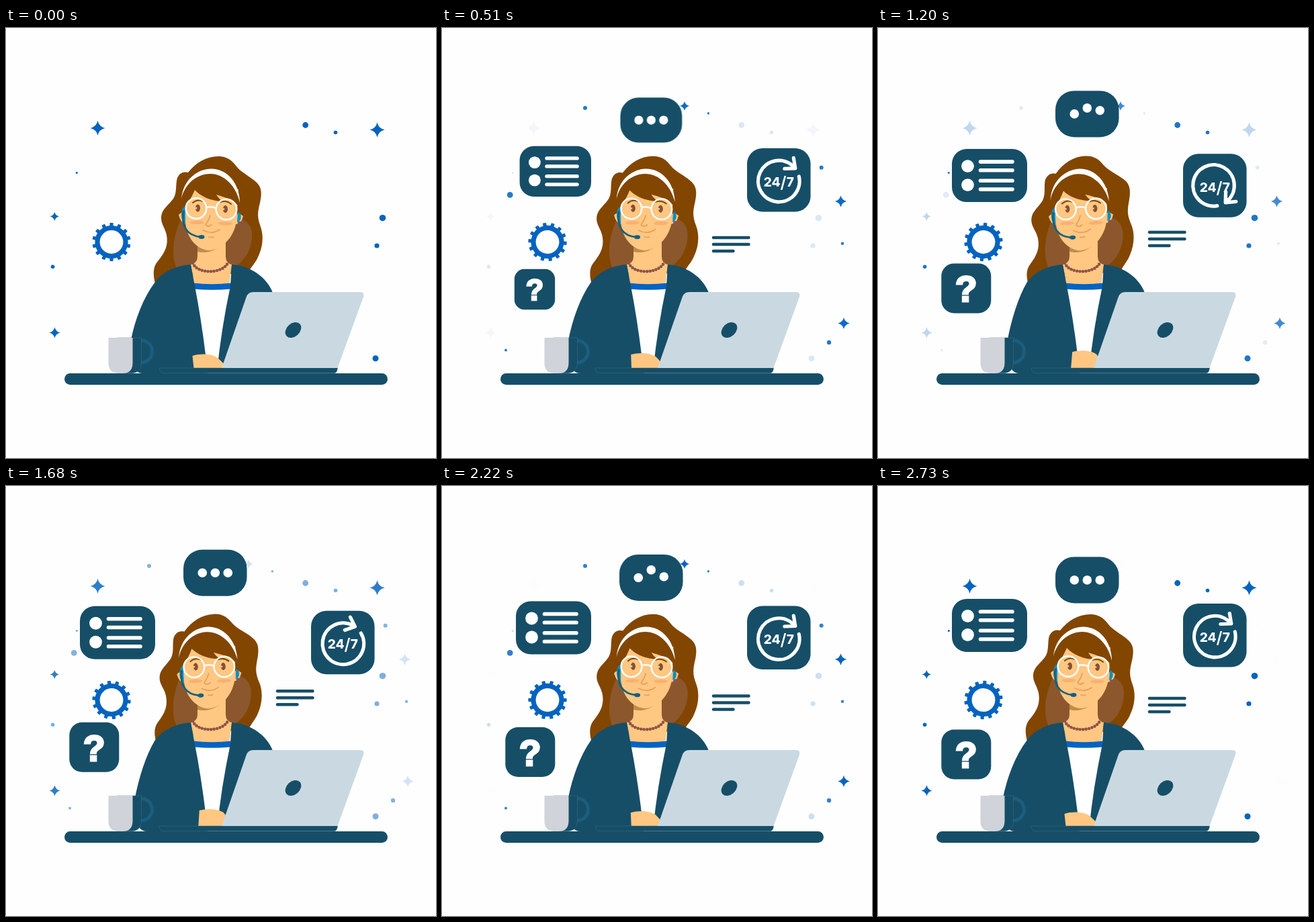
Animation, 640 px wide and 640 px high, one loop 2760 ms. Source, as an HTML page:

```html
<!DOCTYPE html>
<html lang="en">
<head>
<meta charset="utf-8">
<title>Customer support</title>
<style>
  html, body { margin: 0; width: 100%; height: 100%; overflow: hidden; background: #fefefe; }
  svg { display: block; width: 100%; height: 100%; }
  .navy { fill: #164e68; }
  .blue { fill: #0463bf; }
  .skin { fill: #ffc782; }
  .hair { fill: #824600; }
  .white { fill: #fff; }
  .line { fill: none; stroke-linecap: round; stroke-linejoin: round; }
</style>
</head>
<body>
<svg viewBox="0 0 640 640" xmlns="http://www.w3.org/2000/svg">
  <g id="sparkles" class="blue"></g>

  <g id="gear">
    <circle r="21" fill="none" stroke="#0463bf" stroke-width="7.2"/>
    <g id="teeth" class="blue"></g>
  </g>

  <g id="backHair">
    <path class="hair" d="M316 191C330 191 337 198 343 206C350 215 362 220 372 229C381 237 381 246 378 260C374 276 374 282 379 296C384 310 382 327 375 341C371 350 366 354 360 364L230 374L222 380C219 368 218 356 226 347C236 335 242 324 239 308C237 298 231 292 231 283C231 270 241 265 249 254C255 245 252 232 255 223C258 216 264 213 271 215C283 200 298 191 316 191Z"/>
    <path fill="#8c572c" d="M262 281C252 302 241 336 257 364L340 356C358 345 367 325 366 305C364 292 357 286 345 283Z"/>
  </g>

  <path class="skin" d="M285 315V340Q285 350 275 352L281 384H332L336 352Q327 350 327 340V310Z"/>
  <path fill="#c08c4e" d="M285 315V333Q309 338 327 316Z"/>
  <path class="white" d="M279 385H336L314 510H298Z"/>
  <path fill="#0463c4" d="M278 379.5Q306 383 336 379.500L334 388.500Q306 391 280 388.500Z"/>
  <path class="line" stroke="#8e5347" stroke-width="4.600" stroke-dasharray="0 4.500" d="M278 350C285 367 322 366 330 350"/>
  <path class="navy" d="M336 352C362 353 389 371 397 394L400 512H314Q320 450 334 384Z"/>
  <path id="sleeve" class="navy"/>

  <g id="head">
    <path class="skin" d="M257 278Q262 272 268 276V291Q260 291 257 278ZM353 280Q346 274 341 279V292Q350 293 353 280Z"/>
    <circle cx="348" cy="291" r="3.200" fill="#8e5347"/>
    <path class="skin" d="M267 240V288C269 318 289 331 303 331C322 329 339 312 343 288L346 240Z"/>
    <path class="hair" d="M264 268C260 235 280 214 304 214C332 214 348 240 348 268C344 262 338 256 328 253Q320 250 313 248Q317 255 323 258C305 258 289 250 281 241C277 250 272 260 264 268Z"/>
    <path class="white" d="M261 254C264 223 288 209.500 305 209.500C330 209.500 348 232 348 260C343 236 325 217 304 217C284 217 266 232 261 254Z"/>
    <path fill="#0e8fc0" d="M267 265C259 268 259 288 267 291ZM345 274C352 276 351 288 344 289Z"/>
    <g class="line" stroke="#824600" stroke-width="2">
      <path d="M278 260Q285 254 293 258M319 259Q328 256 335 262"/>
    </g>
    <g fill="#84503a">
      <ellipse cx="285.500" cy="268" rx="3.500" ry="5.500"/>
      <ellipse cx="326.500" cy="269.500" rx="3.500" ry="5.500"/>
    </g>
    <g class="skin"><circle cx="283" cy="268" r="1.500"/><circle cx="324" cy="269.500" r="1.500"/></g>
    <g fill="#fbb06f">
      <ellipse cx="284" cy="289.500" rx="10.500" ry="2.700"/>
      <ellipse cx="326.500" cy="291" rx="10.500" ry="2.700"/>
    </g>
    <g class="line" stroke="#e5a05a" stroke-width="1.700">
      <path d="M304 279C303 285 299 289 297 293Q301 297 306 293M293 301Q307 308 318 300M302 311Q305 312 309 311"/>
    </g>
    <g class="line" stroke="#fff" stroke-width="2.400">
      <circle cx="283" cy="268.500" r="15.300"/>
      <circle cx="328" cy="270" r="15.300"/>
      <path d="M299 267Q306 265 312 268"/>
    </g>
    <path class="line" stroke="#14607f" stroke-width="2.800" d="M264 273C261 294 268 309 290 311"/>
    <ellipse cx="291" cy="311" rx="4.500" ry="3" fill="#14607f"/>
  </g>

  <path id="hand" class="skin"/>
  <rect class="navy" x="87" y="514" width="481" height="17" rx="8.500"/>
  <path class="navy" stroke="#3a738c" stroke-width=".5" d="M228 506H493.500Q493 513.700 488 513.700H235Q228 513.700 228 506Z"/>
  <path fill="#cad9e1" d="M321 506L357.500 401Q360 393 368 393H527Q534 393 532 400L493.500 506Z"/>
  <ellipse class="navy" rx="13.300" ry="9.700" transform="translate(427.500 449.500) rotate(-42)"/>

  <path fill="none" stroke="#1b5e7e" stroke-width="5" d="M201 465A16.500 16.500 0 0 1 201 498"/>
  <path class="navy" stroke="#3a738c" stroke-width=".5" d="M166 461H201.500V499Q201 513.700 186 513.700H170Z"/>
  <path fill="#d0d3d9" d="M152.500 461H188.500V499Q188 514 174 514H167Q152.500 513 152.500 499Z"/>

  <g id="chat">
    <rect class="navy" x="-47.250" y="-34.500" width="94.500" height="69" rx="28"/>
    <g id="dots" class="white"><circle cx="-19" r="6.800"/><circle r="6.800"/><circle cx="19" r="6.800"/></g>
  </g>
  <g id="list">
    <rect class="navy" x="-56" y="-39.500" width="112" height="79" rx="22"/>
    <g class="white"><circle cx="-32.500" cy="-14" r="9.400"/><circle cx="-32.500" cy="14" r="9.400"/></g>
    <path class="line" stroke="#fff" stroke-width="5.600" d="M-13.500-20.500H34M-13.500-7.800H34M-13.500 7.700H34M-13.500 20.500H34"/>
  </g>
  <g id="hours">
    <rect class="navy" x="-47.250" y="-47.250" width="94.500" height="94.500" rx="23"/>
    <text class="white" y="9.300" text-anchor="middle" font-family="Inter, Arial, sans-serif" font-weight="800" font-size="19">24<tspan font-size="24" font-weight="600" dy="2">/</tspan><tspan dy="-2">7</tspan></text>
    <g id="arrow" class="line" stroke="#fff" stroke-width="5.200">
      <path transform="translate(0 1.700)" d="M30-7A30.800 30.800 0 1 1 22-21.500M22-34.500L24.500-19L8.500-18.500"/>
    </g>
  </g>
  <g id="help">
    <rect class="navy" x="-37" y="-37" width="74" height="74" rx="19"/>
    <text id="mark" class="white" stroke="#fff" stroke-width="3" y="20" text-anchor="middle" font-family="Liberation Sans, Arial, sans-serif" font-weight="700" font-size="53">?</text>
  </g>
  <g id="notes">
    <path class="line" stroke="#164e68" stroke-width="4.500" d="M-26-10H26.500M-26 0H26.500M-26 10H3.500"/>
  </g>
</svg>

<script>
const LOOP = 2760, STEP = 30, CYCLE = 2700;
const $ = id => document.getElementById(id);
const clamp = u => Math.max(0, Math.min(1, u));
const smooth = u => u * u * (3 - 2 * u);
const progress = (t, start, length) => clamp((t - start) / length);
const wave = (t, period) => (1 + Math.cos(2 * Math.PI * t / period)) / 2;

// Each sparkle is [x, y, radius].
const STAR = 'M0-1Q.18-.18 1 0Q.18.18 0 1Q-.18.18-1 0Q-.18-.18 0-1Z';
const DISC = 'M-1 0A1 1 0 0 1 1 0A1 1 0 0 1-1 0Z';
function sparkleGroup(shape, places) {
  const group = document.createElementNS('http://www.w3.org/2000/svg', 'g');
  group.innerHTML = places.map(([x, y, r]) =>
    `<path d="${shape}" transform="translate(${x} ${y}) scale(${r})"/>`).join('');
  $('sparkles').append(group);
  return group;
}
const starsA = sparkleGroup(STAR, [[136.5, 149, 11], [552.5, 151.5, 11], [72.3, 280.5, 6.7], [72.5, 453.5, 8.2]]);
const starsB = sparkleGroup(STAR, [[361, 116, 7], [593.5, 258, 8.7], [598, 439.5, 8.7]]);
const discsA = sparkleGroup(DISC, [[445.7, 144.5, 4.4], [490.5, 155.5, 2.8], [560.5, 282.7, 4.8],
  [552, 324, 3.6], [550, 491.7, 4.5], [105.3, 215.5, 1.6], [69.6, 355.3, 2.8]]);
const discsB = sparkleGroup(DISC, [[213, 119, 3], [396.4, 127, 1.7], [101.2, 248.4, 4.4],
  [564.7, 207.8, 3], [596, 320.8, 2.2], [576, 468, 3.2], [95, 479.5, 2]]);

$('teeth').innerHTML = Array.from({ length: 14 }, (_, i) =>
  `<rect x="-2.6" y="-28.6" width="5.2" height="6" rx=".8" transform="rotate(${i * 360 / 14})"/>`).join('');

// px, py: offset from the centre to the point each card grows out of.
const cards = [
  { id: 'chat',  x: 311.3, y: 140,   bob: -12.5, px: 0,    py: 34.5,  start: 150 },
  { id: 'list',  x: 166,   y: 207.5, bob: 12.5,  px: 56,   py: 39.5,  start: 164 },
  { id: 'hours', x: 501.3, y: 222.3, bob: 12.5,  px: -47,  py: 47,    start: 80 },
  { id: 'help',  x: 131.3, y: 399.5, bob: -12.5, px: 37,   py: -37,   start: 218 },
  { id: 'notes', x: 430,   y: 326,   bob: -12.5, px: -28,  py: 0,     start: 60 },
];
const hops = [823, 1882];

function draw(t) {
  const sway = 1 - wave(t, CYCLE);
  const set = (id, transform) => $(id).setAttribute('transform', transform);

  starsA.style.opacity = wave(t, 900);
  starsB.style.opacity = 1 - wave(t, 900);
  discsA.style.opacity = wave(t, 1350);
  discsB.style.opacity = 1 - wave(t, 1350);
  set('gear', `translate(157 318.5) rotate(${360 * t / CYCLE})`);

  const tilt = `rotate(${-3.2 * sway} 305 335)`;
  set('backHair', tilt);
  set('head', tilt);

  const lift = 6 * sway, slide = 10 * sway;
  $('hand').setAttribute('d', `M${277.5 + slide * 1.2} ${488 - lift}` +
    `C${290 + slide} ${484 - lift * .8} ${306 + slide} ${485 - lift} ${315 + slide} ${491 - lift}` +
    `L${330 + slide} 505V511H${280 + slide * .7}Z`);
  const k = 7 * sway;
  $('sleeve').setAttribute('d', `M275 352C250 354 232 364 222 378C${204 + k * .6} 402 ${192 + k} 434 ${186 + k} 464` +
    `V490Q${189 + k} 514 ${204 + k} 514H300L297 486Q290 430 281 384Z`);

  for (const c of cards) {
    const grow = smooth(progress(t, c.start, 400));
    set(c.id, `translate(${c.x + c.px} ${c.y + c.bob * sway + c.py}) scale(${grow}) translate(${-c.px} ${-c.py})`);
  }

  [...$('dots').children].forEach((dot, i) => {
    const hop = hops.reduce((sum, start) =>
      sum + Math.sin(Math.PI * progress(t, start + 150 * i, 337)) ** 2, 0);
    dot.setAttribute('cy', -12 * hop);
  });
  set('arrow', `rotate(${360 * smooth(progress(t, 900, 900))})`);
  set('mark', `rotate(${7.5 * Math.sin(4 * Math.PI * progress(t, 700, 400))})`);
}

function tick() {
  draw(Math.floor(performance.now() % LOOP / STEP) * STEP);
  requestAnimationFrame(tick);
}
tick();
</script>
</body>
</html>
```
